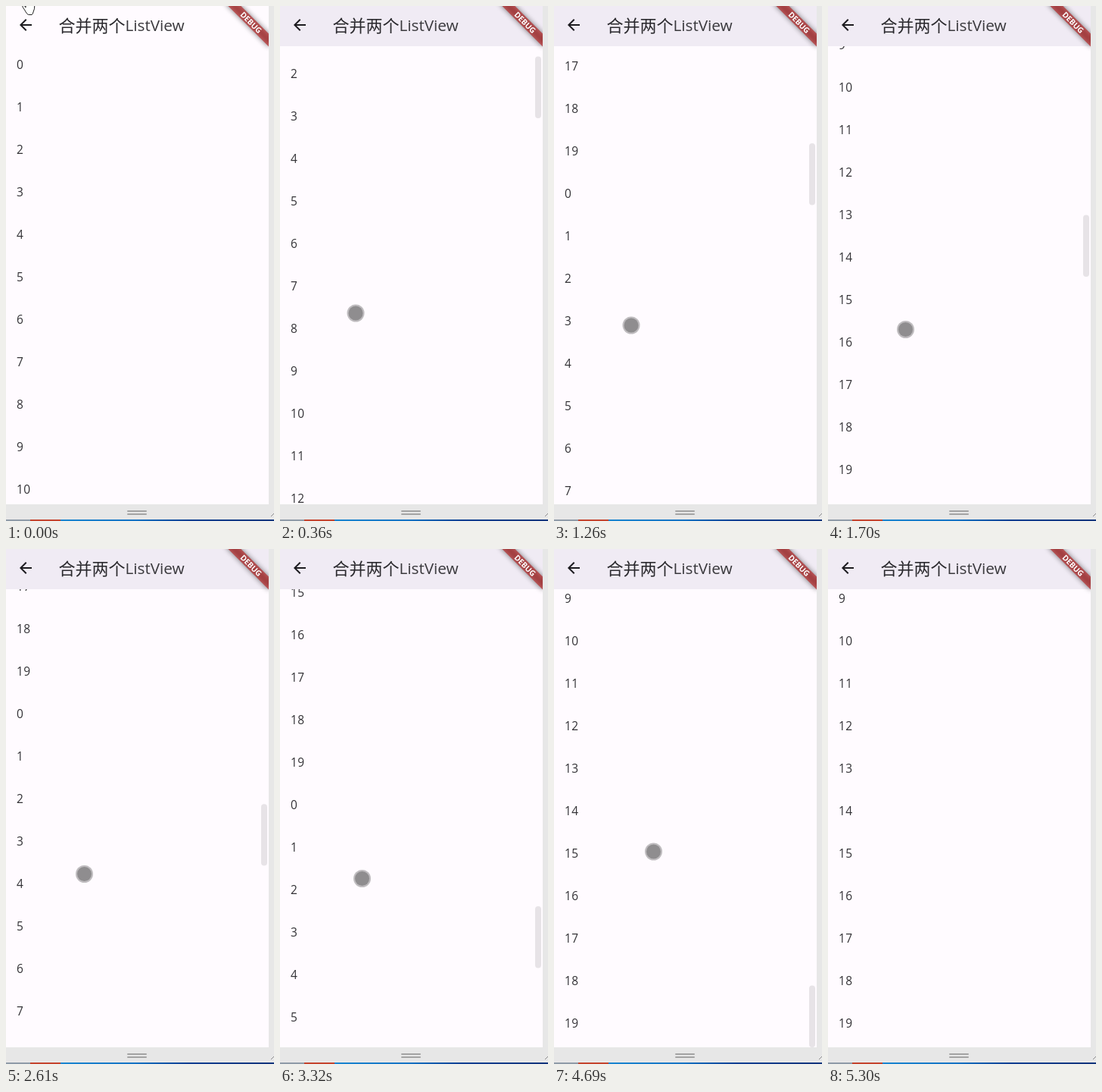
Animation, 354 px wide and 679 px high, one loop 5390 ms. Source, as an HTML page:

```html
<!DOCTYPE html>
<html lang="zh">
<head>
<meta charset="utf-8">
<title>合并两个ListView</title>
<style>
html, body { margin: 0; width: 100%; height: 100%; overflow: hidden; background: #fffbff; }
svg { display: block; width: 354px; height: 679px; font-family: "Open Sans", "Noto Sans CJK SC", "Noto Sans CJK", sans-serif; }
#list { font-size: 15.5px; letter-spacing: .5px; fill: #333236; }
</style>
</head>
<body>
<svg viewBox="0 0 354 679">
  <defs>
    <clipPath id="page"><rect width="347" height="657"/></clipPath>
    <filter id="blur" x="-50%" y="-200%" width="200%" height="500%"><feGaussianBlur stdDeviation="3.96"/></filter>
    <linearGradient id="blue">
      <stop offset="0" stop-color="#1a86d0"/>
      <stop offset=".35" stop-color="#1673c4"/>
      <stop offset=".6" stop-color="#0a3f92"/>
      <stop offset="1" stop-color="#12357c"/>
    </linearGradient>
  </defs>
  <g clip-path="url(#page)">
    <rect width="347" height="657" fill="#fffbff"/>
    <g id="list"></g>
    <rect id="thumb" x="337" width="8" rx="4" fill="#e7e3e7"/>
    <rect id="bar" width="347" height="53"/>
    <path transform="translate(14 13)" fill="#1c1b1f" d="M20 11H7.83l5.59-5.59L12 4l-8 8 8 8 1.41-1.41L7.83 13H20z"/>
    <text x="69.5" y="34" font-size="22" font-weight="300" fill="#2a292d">合并两个<tspan dy="-1" font-size="20.75" font-weight="400" fill="#3a393d">ListView</tspan></text>
    <g transform="translate(347 -3) rotate(45)">
      <rect x="-40" y="28" width="80" height="12" opacity=".5" filter="url(#blur)"/>
      <rect x="-40" y="28" width="80" height="12" fill="#b71c1c" fill-opacity=".627"/>
      <text x="1" y="37.7" font-size="10.2" font-weight="700" text-anchor="middle" fill="#fff">DEBUG</text>
    </g>
  </g>
  <path fill="#e7e7e7" d="M347 0h7v677H0v-20h347z"/>
  <path stroke="#a3a3a3" stroke-width="2" stroke-linecap="round" d="M161 666h24M161 670h24"/>
  <path stroke="#8c8c8c" d="M350 673l4-4"/>
  <path fill="#8f9ba8" d="M0 677h32v2H0z"/>
  <path fill="#c4452f" d="M32 677h40v2H32z"/>
  <rect x="72" y="677" width="282" height="2" fill="url(#blue)"/>
  <g id="touch">
    <circle r="11.5" fill="#000" fill-opacity=".25"/>
    <circle r="9.5" fill="#8f8d8f"/>
  </g>
  <path id="hand" fill="#fff" stroke="#222" stroke-linejoin="round" d="M26-12V2L24-1Q22-2 21.700 0Q22 2 24.500 5Q26 8 28 10.500Q29 11.500 31 11.500H34Q35.500 11 36 8Q38 4 37.800-1V-6Q34-9 30-8V-12Z"/>
</svg>
<script>
const LOOP = 5390, TICK = 90, LEAD = 20;
const COUNT = 80, ROW = 56, TOP = 53, VIEW = 604;
const CONTENT = COUNT * ROW, END = CONTENT - VIEW, THUMB = VIEW * VIEW / CONTENT;
const ENTER = 1, LEAVE = 58;

// Wheel bursts: [first tick, last tick, offset reached]
const bursts = [
  [4, 6, 350], [9, 10, 550], [12, 19, 1650], [26, 27, 1950], [29, 33, 2600],
  [35, 37, 3100], [38, 39, 3600], [42, 43, 3800], [46, 46, END]
];

// Key points of the touch dot: [tick, x, y]
const path = [
  [ENTER, 42, 40], [4, 100, 405], [9, 101.5, 415.5], [19, 102.5, 426.5], [29, 103.5, 428.5],
  [37, 108.5, 434.5], [43, 108.5, 438.5], [51, 108.5, 438.5], [54, 177.5, 320], [LEAVE - 1, 40.5, 24]
];

const $ = id => document.getElementById(id);
const set = (id, attrs) => { for (const k in attrs) $(id).setAttribute(k, attrs[k]); };
const show = (id, on) => set(id, { visibility: on ? "visible" : "hidden" });
const clamp = v => Math.min(1, Math.max(0, v));
const mix = (a, b, k) => a + (b - a) * k;
const snap = (v, step) => Math.round(v / step) * step;

$("list").innerHTML = Array.from({ length: COUNT }, (_, i) =>
  `<text x="14" y="${83 + i * ROW}">${i % 20}</text>`).join("");
set("thumb", { height: THUMB });

// Each burst advances in equal notches, rounded to 50 px
function scrollAt(tick) {
  const raw = bursts.reduce((from, [first, last, to]) =>
    mix(from, to, clamp((tick - first + 1) / (last - first + 1))), 0);
  return Math.min(END, snap(raw, 50));
}

function pointAt(tick) {
  const i = Math.max(1, path.findIndex(p => p[0] >= tick));
  const [t0, x0, y0] = path[i - 1], [t1, x1, y1] = path[i];
  const k = clamp((tick - t0) / (t1 - t0));
  return [snap(mix(x0, x1, k), .5), snap(mix(y0, y1, k), .5)];
}

function draw(now) {
  const t = now % LOOP;
  const tick = Math.floor((t + LEAD) / TICK);
  const scroll = scrollAt(tick);
  set("list", { transform: `translate(0 ${-scroll})` });
  set("bar", { fill: scroll ? "#f0ebf4" : "#fffbff" });
  set("thumb", {
    y: mix(TOP, TOP + VIEW - THUMB, scroll / END),
    opacity: scroll ? 1 - clamp((t - 4740) / 300) : 0
  });
  set("touch", { transform: `translate(${pointAt(tick)})` });
  set("hand", { transform: tick ? "translate(10 -4)" : "" });
  show("touch", tick >= ENTER && tick < LEAVE);
  show("hand", tick < ENTER || tick === LEAVE);
}

const start = performance.now();
function run() {
  draw(performance.now() - start);
  requestAnimationFrame(run);
}
run();
</script>
</body>
</html>
```
